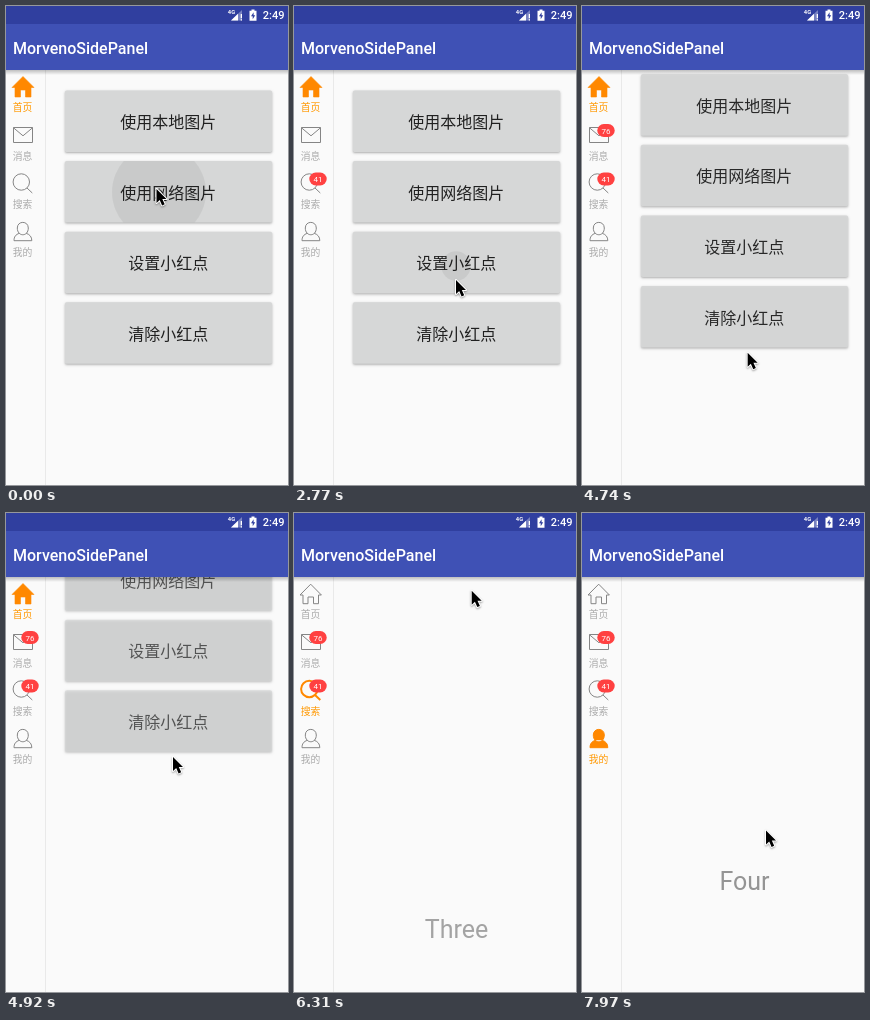
Animation, 282 px wide and 479 px high, one loop 8 s. Source, as an HTML page with a canvas:

```html
<!DOCTYPE html>
<html lang="zh-CN">
<head>
<meta charset="utf-8">
<style>
html, body { margin: 0; width: 100%; height: 100%; overflow: hidden; background: #fafafa; }
canvas { display: block; width: 282px; height: 479px; }
</style>
</head>
<body>
<canvas id="stage"></canvas>
<script>
const W = 282, H = 479, LOOP = 8000;
const TOP = 64, LEFT = 40, PAGE = H - TOP;
const LATIN = 'Roboto, sans-serif';
const CJK = '"Noto Sans CJK SC", "Noto Sans CJK", sans-serif';
const ORANGE = '#ff8800';

const canvas = document.getElementById('stage');
const ratio = window.devicePixelRatio || 1;
canvas.width = W * ratio;
canvas.height = H * ratio;
const ctx = canvas.getContext('2d');

// Pointer path: time, x, y
const POINTER = [
  [0, 150.5, 183], [810, 150.5, 183], [890, 150.5, 188], [1040, 150.5, 188],
  [1290, 163, 279.5], [1400, 163, 279.5], [1520, 162, 274], [3750, 162, 274],
  [3900, 112, 264], [4000, 64, 253], [4090, 32, 244], [4180, 27, 230],
  [4300, 52, 262], [4440, 125, 355], [4570, 165, 403], [4600, 165, 400],
  [4920, 167, 244], [5200, 168, 95], [5340, 168, 39], [5390, 168, 50],
  [5480, 169, 94.5], [5700, 172, 300], [5790, 173, 345], [5860, 174, 326],
  [6220, 177, 125], [6360, 178, 66], [6750, 179, 275], [6850, 179, 292],
  [6930, 179, 262], [7100, 180, 172.5], [7310, 181, 66], [7560, 183, 240],
  [7860, 184, 151], [7970, 184, 317.5], [8000, 184, 317.5]
];

const DRAGS = [
  { start: 4600, release: 5210, y0: 363 },
  { start: 5790, release: 6290, y0: 330 },
  { start: 6850, release: 7290, y0: 260.5 }
];
const SETTLE = 600;
const PULL_BACK = { start: 7860, y0: 220.5 };

const PRESSES = [
  { button: 1, x: 153, y: 186, start: -200, grow: 100, end: 250 },
  { button: 2, x: 162, y: 260, start: 1810, grow: 100, end: 2230 },
  { button: 2, x: 162, y: 260, start: 2760, grow: 130, end: 3150 }
];

const BUTTONS = ['使用本地图片', '使用网络图片', '设置小红点', '清除小红点'];
const BADGES = [
  { text: '76', y: 124.5, from: 2830 },
  { text: '41', y: 173, from: 1850 }
];

function slope(a, b, k) { return (b[k] - a[k]) / (b[0] - a[0]); }

function tangent(i, k) {
  if (i <= 0 || i >= POINTER.length - 1) return 0;
  const a = slope(POINTER[i - 1], POINTER[i], k);
  const b = slope(POINTER[i], POINTER[i + 1], k);
  return a * b > 0 ? 2 * a * b / (a + b) : 0;
}

// Monotone cubic interpolation, so pauses stay still
function pointerAt(t) {
  let i = 0;
  while (i < POINTER.length - 2 && POINTER[i + 1][0] <= t) i++;
  const a = POINTER[i], b = POINTER[i + 1], d = b[0] - a[0];
  const u = (t - a[0]) / d, v = 1 - u;
  const at = k => a[k] * (1 + 2 * u) * v * v + b[k] * u * u * (3 - 2 * u)
    + d * (tangent(i, k) * u * v * v - tangent(i + 1, k) * u * u * v);
  return { x: at(1), y: at(2) };
}

function scrollAt(t) {
  if (t >= PULL_BACK.start) return 3 * PAGE - Math.max(0, pointerAt(t).y - PULL_BACK.y0);
  let scroll = 0;
  DRAGS.forEach((drag, i) => {
    if (t < drag.start) return;
    const moved = Math.max(0, drag.y0 - pointerAt(Math.min(t, drag.release)).y);
    const u = Math.min(1, Math.max(0, (t - drag.release) / SETTLE));
    scroll = i * PAGE + PAGE - (PAGE - moved) * Math.pow(1 - u, 5);
  });
  return scroll;
}

function text(str, x, y, font, color, align = 'center') {
  ctx.font = font;
  ctx.fillStyle = color;
  ctx.textAlign = align;
  ctx.fillText(str, x, y);
}

function box(x, y, w, h, color) {
  ctx.fillStyle = color;
  ctx.fillRect(x, y, w, h);
}

function roundBox(x, y, w, h, r) {
  ctx.beginPath();
  ctx.roundRect(x, y, w, h, r);
}

function shape(d, fill, stroke, width = 1) {
  const path = new Path2D(d);
  if (stroke) {
    ctx.strokeStyle = stroke;
    ctx.lineWidth = width;
    ctx.stroke(path);
  }
  if (fill) {
    ctx.fillStyle = fill;
    ctx.fill(path);
  }
}

function drawButton(i, t) {
  const x = 59, y = 84.5 + i * 70.6, w = 207, h = 61.5;
  const press = PRESSES.find(p => p.button === i && t >= p.start && t < p.end);
  const growth = press ? Math.min(1, (t - press.start) / press.grow) : 0;
  ctx.save();
  ctx.shadowColor = 'rgba(0,0,0,.32)';
  ctx.shadowBlur = (2.5 + 2 * Math.sin(growth * Math.PI)) * ratio;
  ctx.shadowOffsetY = 1 * ratio;
  ctx.fillStyle = '#d6d7d7';
  roundBox(x, y, w, h, 1.6);
  ctx.fill();
  ctx.restore();
  if (press) {
    ctx.save();
    roundBox(x, y, w, h, 1.6);
    ctx.clip();
    ctx.beginPath();
    ctx.arc(press.x, press.y, 12 + 35 * growth, 0, 7);
    ctx.fillStyle = 'rgba(0,0,0,.06)';
    ctx.fill();
    ctx.restore();
  }
  text(BUTTONS[i], 162.3, y + 37.6, '16px ' + CJK, '#202020');
}

function drawPages(t, scroll) {
  ctx.save();
  ctx.beginPath();
  ctx.rect(LEFT, TOP, W - LEFT, PAGE);
  ctx.clip();
  ['', 'Two', 'Three', 'Four'].forEach((word, i) => {
    const offset = i * PAGE - scroll;
    if (Math.abs(offset) >= PAGE) return;
    ctx.save();
    ctx.globalAlpha = 1 - Math.abs(offset) / PAGE;
    ctx.translate(0, offset);
    if (word) text(word, 162.5, 280, '25px ' + LATIN, '#757575');
    else BUTTONS.forEach((_, n) => drawButton(n, t));
    ctx.restore();
  });
  ctx.restore();
}

const LINE = '#858585';
const TABS = [
  { label: '首页', icon(on) {
    if (on) shape('M17 70.5L28 81.5H25V91H19.5V84H14.5V91H9V81.5H6Z', ORANGE, ORANGE, .6);
    else shape('M6 82L16.7 71.2L27.4 82H24.5V90.7H19.5V84H14V90.7H9V82Z', null, LINE);
  } },
  { label: '消息', icon(on) {
    shape('M7.5 121.5H26.5V136.5H7.5Z', on ? ORANGE : null, on ? ORANGE : LINE);
    shape('M7.5 121.8L17 129.8L26.5 121.8', null, on ? '#ffd7a3' : LINE);
  } },
  { label: '搜索', icon(on) {
    shape('M23.5 176A8.2 8.2 0 1 1 7.1 176A8.2 8.2 0 1 1 23.5 176M21 182L26.3 187',
      null, on ? ORANGE : LINE, on ? 2 : 1);
  } },
  { label: '我的', icon(on) {
    shape('M22.3 222C22.3 231 11.3 231 11.3 222C11.3 214.5 22.3 214.5 22.3 222Z'
      + 'M13.4 227.3C9.5 228.5 8 231 8 234.7H25.8C25.8 231 24 228.5 20.2 227.3',
      on ? ORANGE : null, on ? ORANGE : LINE);
  } }
];

function drawTabs(t) {
  const active = DRAGS.filter(d => t >= d.release).length;
  box(39, TOP, 1, PAGE, '#e9e9e9');
  TABS.forEach((tab, i) => {
    const on = i === active;
    tab.icon(on);
    text(tab.label, 16.6, 105.4 + i * 48.2, (on ? '500 ' : '') + '9.8px ' + CJK, on ? '#ff9800' : '#aaaaaa');
  });
  for (const badge of BADGES) {
    if (t < badge.from) continue;
    roundBox(15.3, badge.y - 6.5, 17.4, 13, 6.5);
    ctx.fillStyle = '#ff4141';
    ctx.fill();
    text(badge.text, 24, badge.y + 3, '8px ' + LATIN, '#fff');
  }
}

function drawBars() {
  const shade = ctx.createLinearGradient(0, TOP, 0, TOP + 5);
  shade.addColorStop(0, 'rgba(0,0,0,.24)');
  shade.addColorStop(1, 'rgba(0,0,0,0)');
  box(0, TOP, W, 5, shade);
  box(0, 0, W, 18, '#303f9f');
  box(0, 18, W, TOP - 18, '#3f51b5');
  text('MorvenoSidePanel', 7, 48, '500 16px ' + LATIN, '#fff', 'left');
  text('2:49', 278.5, 13, '500 11px ' + LATIN, '#fff', 'right');

  shape('M236 4V14.5H225Z', 'rgba(255,255,255,.35)');
  shape('M232 7.8V14.5H225Z', '#fff');
  box(234.7, 8, 1.3, 4.2, '#fff');
  box(234.7, 13.2, 1.3, 1.3, '#fff');
  text('4G', 225.5, 8, 'bold 5.8px ' + LATIN, '#fff');

  shape('M245.5 3.5H248.5V4.8H250.5V14.8H243.5V4.8H245.5Z', '#fff');
  shape('M247.6 6.3L245 10.3H246.7V13.3L249.2 9.3H247.6Z', '#303f9f');
}

function drawPointer({ x, y }) {
  const arrow = 'M0 0V14L3.2 11.1L5.6 16.4L8.2 15.2L5.8 10H10Z';
  ctx.save();
  ctx.translate(x, y);
  ctx.lineJoin = 'round';
  ctx.shadowColor = 'rgba(0,0,0,.35)';
  ctx.shadowBlur = 2 * ratio;
  ctx.shadowOffsetY = 1 * ratio;
  shape(arrow, null, '#fff', 2);
  ctx.shadowColor = 'transparent';
  shape(arrow, '#000');
  ctx.restore();
}

function draw(now) {
  const t = now % LOOP;
  ctx.setTransform(ratio, 0, 0, ratio, 0, 0);
  box(0, 0, W, H, '#fafafa');
  drawPages(t, scrollAt(t));
  drawTabs(t);
  drawBars();
  drawPointer(pointerAt(t));
}

let origin;
function tick(now) {
  if (origin === undefined) origin = now;
  draw(Math.max(0, now - origin));
  requestAnimationFrame(tick);
}
draw(0);
requestAnimationFrame(tick);
</script>
</body>
</html>
```
